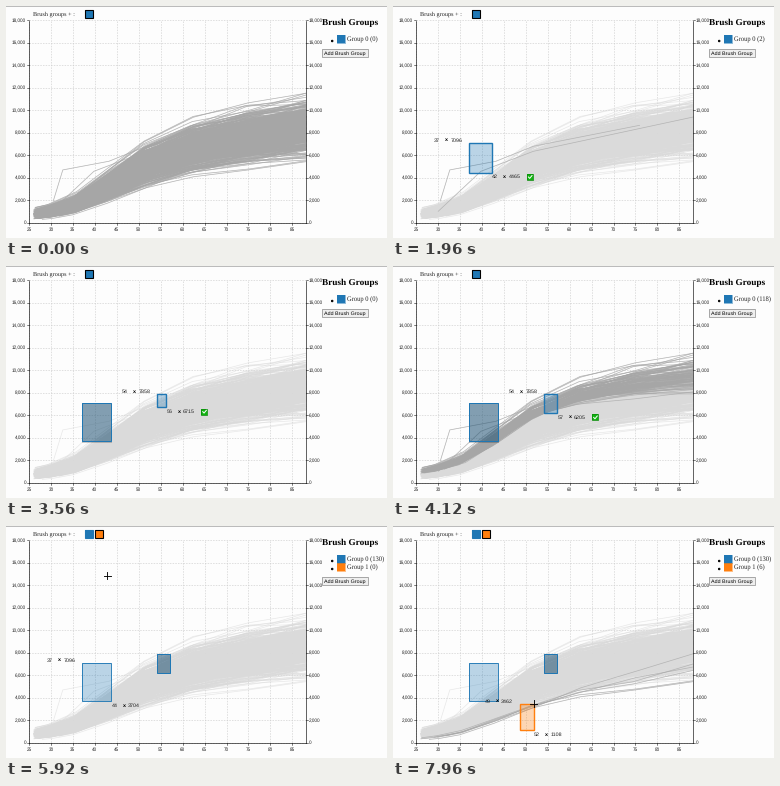
A matplotlib script that plays this animation: 381 by 232 pixels, repeating every 8 s.

```python
import numpy as np
import matplotlib.pyplot as plt
from matplotlib.animation import FuncAnimation
from matplotlib.collections import LineCollection
from matplotlib.patches import Circle, Polygon, Rectangle

plt.rcParams["text.hinting"] = "none"

W, H, DPI = 381, 232, 64
PX = 72 / DPI
STEP, FRAMES = 40, 200
BLUE, ORANGE = "#1f77b4", "#ff7f0e"
SANS, SERIF = "Liberation Sans", "Liberation Serif"
DONE_B, ADD_GROUP, PICK_GROUP = 4240, 4800, 5720

fig = plt.figure(figsize=(W / DPI, H / DPI), dpi=DPI, facecolor="#fdfdfd")
ax = fig.add_axes([0, 0, 1, 1])
ax.set(xlim=(0, W), ylim=(H, 0))
ax.axis("off")


def sx(age):
    return 23 + (np.asarray(age) - 25) * 4.39


def sy(value):
    return 216.8 - np.asarray(value) * 0.01125


def line(xs, ys, color="black", width=0.6, **kw):
    return ax.plot(xs, ys, color=color, lw=width * PX, **kw)[0]


def text(x, y, s, size, font=SANS, color="#222222", **kw):
    return ax.text(x, y, s, fontsize=size * PX, family=font, color=color, **kw)


def box(x0, y0, x1, y1, face, edge="none", width=1.0, alpha=1.0, z=3):
    shape = (x0, y0), x1 - x0, y1 - y0
    fill = Rectangle(*shape, fc=face, ec="none", alpha=alpha, zorder=z)
    rim = Rectangle(*shape, fc="none", ec=edge, lw=width * PX, zorder=z + 0.1)
    return [ax.add_patch(fill), ax.add_patch(rim)]


def waypoint(t, keys):
    times, xs, ys = zip(*keys)
    return np.interp(t, times, xs), np.interp(t, times, ys)


def typical(age):
    """Median growth: an S-curve that continues as a slow linear rise."""
    s_curve = 500 + 5900 / (1 + np.exp(-(age - 44) / 6))
    return s_curve + 60 * np.maximum(age - 55, 0)


def make_series(rng, count=560):
    knots = np.geomspace(29.5, 90, 7)
    for _ in range(count):
        start = 26 + min(rng.exponential(2.2), 8)
        end = 88.1 if rng.random() < 0.9 else rng.uniform(65, 88)
        inner = knots + rng.normal(0, 0.5, knots.size)
        ages = np.r_[start, inner[(inner > start + 1) & (inner < end - 1)], end]
        early, late = np.clip(rng.normal(size=2), -2.7, 2.7)
        turn = np.clip((ages - 38) / 50, 0, 1) * 1.15
        z = early * np.cos(turn) + late * np.sin(turn)
        spread = 0.13 + 0.1 * np.exp(-(ages - 30) / 15)
        noise = 1 + 0.02 * rng.normal(size=ages.size)
        values = typical(ages) * (1 + spread * z) * noise
        yield ages, np.maximum.accumulate(values)


# Two series that rise unusually early
series = list(make_series(np.random.default_rng(7)))
series.append(([30.5, 32.7, 43.2, 51.7, 76], [1900, 4700, 5470, 6800, 8670]))
series.append(([30, 39.8, 51.7, 88.1], [1000, 4580, 6350, 9400]))
segments = [np.column_stack([sx(a), sy(v)]) for a, v in series]


def values_at(age):
    return np.array([np.interp(age, a, v) for a, v in series])


class Brush:
    """A rectangle dragged from a fixed anchor to a far corner, in data units."""

    def __init__(self, start, end, anchor, corner, color, ranking, total):
        self.start, self.end, self.color = start, end, color
        self.anchor, self.corner = np.array(anchor), np.array(corner)
        self.ranking, self.total = ranking, total

    def progress(self, t):
        p = np.clip((t - self.start) / (self.end - self.start), 0, 1)
        return 1 - (1 - p) ** 1.512

    def tip(self, t):
        return self.anchor + (self.corner - self.anchor) * self.progress(t)

    def bounds(self, t):
        (x0, y0), (x1, y1) = self.anchor, self.tip(t)
        return x0, max(y0, y1), x1, min(y0, y1)

    def count(self, t):
        return int(round(self.total * self.progress(t) ** 18))

    def chosen(self, t):
        return self.ranking[:self.count(t)]

    def draw(self, t, muted=False, width=1.4):
        x0, top, x1, bottom = self.bounds(t)
        l, r, u, d = sx(x0), sx(x1), sy(top), sy(bottom)
        if muted:
            live.extend(box(l - 0.5, u - 0.3, r + 1.2, d + 1.4, "black", alpha=0.2, z=4))
            live.extend(box(l, u, r, d, "#2c6a93", self.color, 1, 0.45, z=5))
        else:
            live.extend(box(l, u, r, d, self.color, self.color, width, 0.3, z=5))

    def tooltip(self, t, tick=False):
        x0, top, x1, bottom = self.bounds(t)
        for x, y, age, value in [(sx(x0) - 35.2, sy(top) - 1.3, x0, top),
                                 (sx(x1) + 0.6, sy(bottom) + 5.8, x1, bottom)]:
            live.append(text(x, y, f"{age:.0f}", 5.4, zorder=7))
            live.append(text(x + 11.2, y - 0.3, "x", 5.4, color="black",
                             weight="bold", zorder=7))
            live.append(text(x + 16.6, y, f"{value:.0f}", 5.4, zorder=7))
        if tick:
            cx, cy = sx(x1) + 38.5, sy(bottom) + 4.4
            live.extend(box(cx - 3, cy - 3, cx + 3, cy + 3, "#12b312", "#0b8f0b", 0.8, z=7))
            live.append(line([cx - 1.7, cx - 0.4, cx + 1.9], [cy, cy + 1.4, cy - 1.4],
                             "white", 1, zorder=8))


early_order = np.argsort(-values_at(41))
both_order = early_order[:207][np.argsort(-values_at(54)[early_order[:207]])]
low_order = np.argsort(values_at(50.5))
first = Brush(880, 2600, (37.1, 7096), (43.7, 3704), BLUE, early_order, 207)
second = Brush(2864, 4160, (54.2, 7858), (57.1, 6196), BLUE, both_order, 130)
third = Brush(7280, 7960, (48.6, 1108), (51.8, 3462), ORANGE, low_order, 6)

# Fixed chart parts
line([0, W], [0, 0], "#bbbbbb", 1)
for age in range(25, 90, 5):
    x = sx(age)
    line([x, x], [15, sy(0)], "#cccccc", 0.6, dashes=(2.5, 2), zorder=0)
    line([x, x], [sy(0), sy(0) + 2.5], width=0.5)
    text(x, 224.5, str(age), 4.6, ha="center")
for value in range(0, 18001, 2000):
    y = sy(value)
    line([23, 300], [y, y], "#cccccc", 0.6, dashes=(2.5, 2), zorder=0)
    for x, label_x, side in [(23, 20, "right"), (300, 303, "left")]:
        line([x, x + (label_x - x) * 0.7], [y, y], width=0.5)
        text(label_x, y + 1.6, f"{value:,}", 4.6, ha=side)
line([23, 300], [sy(0), sy(0)], zorder=3)
line([23, 23], [15, sy(0)], zorder=3)
line([300, 300], [15, sy(0)], zorder=3)
text(27, 9.8, "Brush groups + :", 6.2, SERIF)
text(316, 19.2, "Brush Groups", 9.3, SERIF, "black", weight="bold")

ax.add_collection(LineCollection(segments, colors="#dadada", alpha=0.6,
                                 linewidths=0.7 * PX, zorder=1))
strong = ax.add_collection(LineCollection([], colors="#a6a6a6", alpha=0.75,
                                          linewidths=0.7 * PX, zorder=2))
live = []


def cursor(x, y, corner=False):
    if 23 <= x <= 300 and y >= 15:
        reach = 0 if corner else 3.5
        live.append(line([x - 3.5, x + reach], [y, y], width=0.9, zorder=9))
        live.append(line([x, x], [y - 3.5, y + reach], width=0.9, zorder=9))
    else:
        arrow = Polygon([(x, y), (x, y + 7), (x + 5, y + 5)], fc="white",
                        ec="black", lw=0.6 * PX, zorder=9)
        live.append(ax.add_patch(arrow))


def panel(t, counts):
    groups = [BLUE, ORANGE][:1 + (t >= ADD_GROUP)]
    active = int(t >= PICK_GROUP)
    for i, color in enumerate(groups):
        x, y = 79.4 + 9.7 * i, 33 + 8 * i
        edge = "black" if i == active else color
        live.extend(box(x, 4, x + 8, 12, color, edge, 1.1))
        live.extend(box(331, y - 3.8, 339, y + 4, color, color, 0.5))
        live.append(ax.add_patch(Circle((326.2, y + 2), 0.8, color="black")))
        live.append(text(341, y + 2.4, f"Group {i} ({counts[i]})", 6.5, SERIF))
    y = 43 + 8 * (len(groups) - 1)
    live.extend(box(316, y + 0.3, 361.7, y + 8.2, "#efefef", "#8a8a8a", 0.7))
    live.append(text(338.8, y + 6.1, "Add Brush Group", 5.4, ha="center", color="black"))


def draw_brushes(t):
    second_on, picked = t >= second.start, t >= PICK_GROUP
    if t >= first.start:
        first.draw(t, muted=second_on and t < DONE_B, width=0.9 if picked else 1.4)
    if second_on:
        second.draw(t, muted=t >= DONE_B)
    if t >= third.start:
        third.draw(t)
        third.tooltip(t)
    elif picked or first.start <= t < second.start:
        first.tooltip(t, tick=not picked)
    elif second_on:
        second.tooltip(t, tick=t < DONE_B)


def draw_cursor(t):
    if 40 <= t <= 840:
        cursor(*waypoint(t, [(40, 346, 22), (840, 76, 137)]))
    elif first.end + 160 <= t < second.start:
        cursor(*waypoint(t, [(2760, 105, 175), (2864, 151, 129)]))
    elif 4720 <= t < third.start:
        x, y = waypoint(t, [(ADD_GROUP, 337, 47), (5080, 144, 138), (PICK_GROUP, 93, 8),
                            (6640, 131, 199.5), (7160, 126.6, 204)])
        cursor(x, y, corner=5000 <= t <= 5160)
    elif t >= third.start:
        age, value = third.tip(t)
        cursor(sx(age), sy(value))


def draw(frame):
    t = frame * STEP
    while live:
        live.pop().remove()
    group_brush = first if t < second.start else second
    if t < first.start:
        chosen = range(len(segments))
    else:
        chosen = (third if t >= PICK_GROUP else group_brush).chosen(t)
    strong.set_segments([segments[i] for i in chosen])
    panel(t, (group_brush.count(t), third.count(t)))
    draw_brushes(t)
    draw_cursor(t)
    return live


anim = FuncAnimation(fig, draw, frames=FRAMES, interval=STEP, repeat=True,
                     repeat_delay=0, init_func=lambda: [], blit=False)
plt.show()
```
